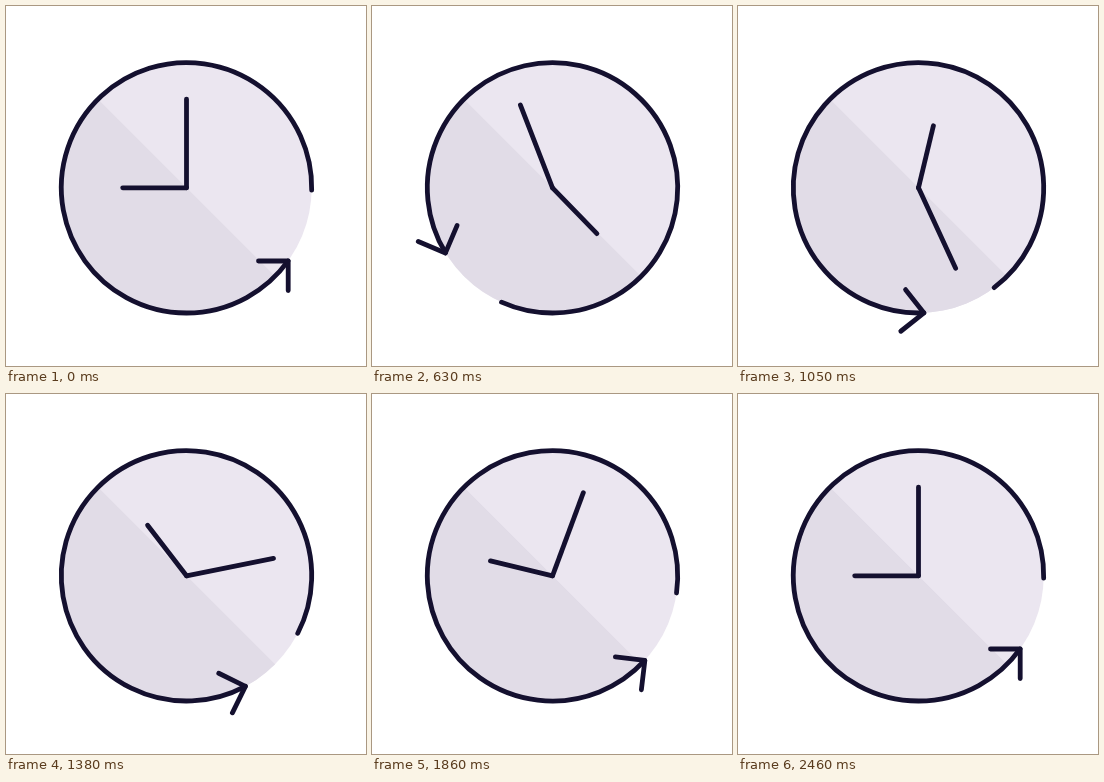
Animation of 360x360 px, one loop 3.52 s. Source, as an HTML page:

```html
<!DOCTYPE html>
<html lang="en">
<head>
<meta charset="utf-8">
<title>Clock turning back</title>
<style>
  html, body { margin: 0; width: 100%; height: 100%; overflow: hidden; background: #fff; }
  svg { display: block; width: 100%; height: 100%; }
  .ink { fill: none; stroke: #14102f; stroke-width: 4.8; stroke-linecap: round; stroke-linejoin: round; }
</style>
</head>
<body>
<svg viewBox="0 0 360 360">
  <g transform="translate(180.5 181.8)">
    <circle r="125.2" fill="#ebe6f0"/>
    <path d="M-88.53 -88.53A125.2 125.2 0 0 0 88.53 88.53Z" fill="#e1dce7"/>
    <g class="ink">
      <g id="ring">
        <path id="arc"/>
        <path d="M72 73.2H101.7V102.7"/>
      </g>
      <path id="minute" d="M0 0V-88.7"/>
      <path id="hour" d="M0 0H-63.8"/>
    </g>
  </g>
</svg>
<script>
const LOOP = 3520, STEP = 30, SPIN = 2450, RADIUS = 125.2;
const $ = id => document.getElementById(id);

function point(deg) {
  const a = deg * Math.PI / 180;
  return `${RADIUS * Math.cos(a)} ${RADIUS * Math.sin(a)}`;
}
$('arc').setAttribute('d', `M${point(35.75)}A${RADIUS} ${RADIUS} 0 1 1 ${point(1.1)}`);

const bezier = (s, a, b) => 3 * s * (1 - s) ** 2 * a + 3 * s * s * (1 - s) * b + s ** 3;

// Cubic-bezier(1/6, 1/6, 0, 1), solved by bisection
function ease(u) {
  if (u <= 0 || u >= 1) return u <= 0 ? 0 : 1;
  let lo = 0, hi = 1;
  for (let i = 0; i < 40; i++) {
    const mid = (lo + hi) / 2;
    if (bezier(mid, 1 / 6, 0) < u) lo = mid; else hi = mid;
  }
  return bezier(lo, 1 / 6, 1);
}

function turn(id, turns, progress) {
  $(id).setAttribute('transform', `rotate(${-360 * turns * progress})`);
}

function draw(ms) {
  const t = Math.floor((ms % LOOP) / STEP) * STEP;
  const p = ease(t / SPIN);
  turn('ring', 1, p);
  turn('hour', 2, p);
  turn('minute', 3, p);
}

const start = performance.now();
function tick() {
  draw(performance.now() - start);
  requestAnimationFrame(tick);
}
draw(0);
requestAnimationFrame(tick);
</script>
</body>
</html>
```
